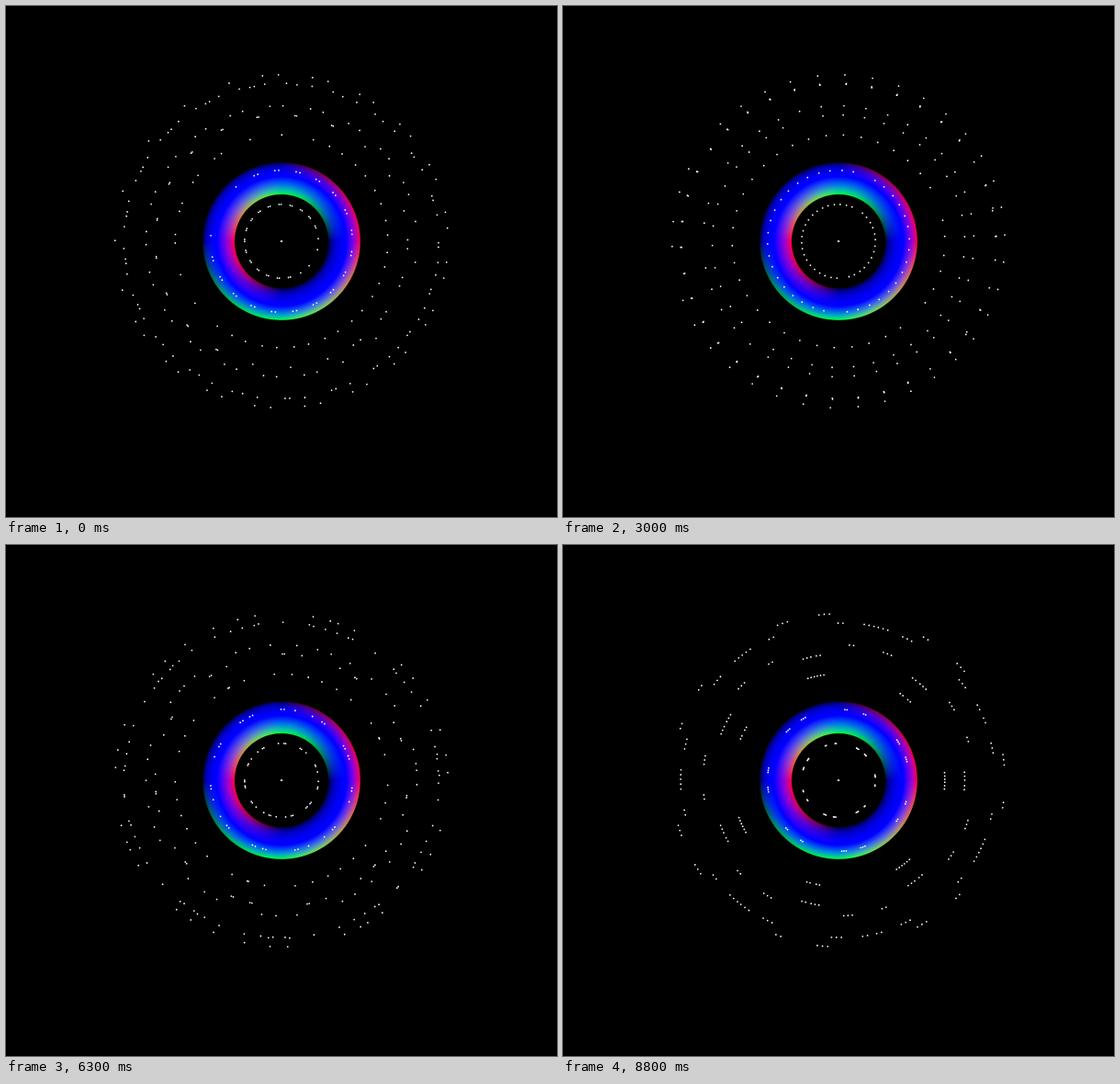
Recreate the animation shown at these times as an HTML page with a canvas. Size 600x556 px, loop 8.9 s.

```html
<!DOCTYPE html>
<html lang="en">
<head>
<meta charset="utf-8">
<title>Torus inside a sphere of dots</title>
<style>
html, body { margin: 0; width: 100%; height: 100%; overflow: hidden; background: #000; }
canvas { display: block; }
</style>
</head>
<body>
<canvas id="stage" width="600" height="556"></canvas>
<script>
const ctx = document.getElementById('stage').getContext('2d');
const W = 600, H = 556, CX = 300, CY = 256;
const LOOP = 8900, TICK = 100;
const RAD = Math.PI / 180;

// Dots on a sphere: each one is a tilt step and a turn step on from the last.
const DOTS = 360, TILT = 18, PHASE = 87;
const SPHERE = 171, DEPTH = 0.332;

// Torus as it appears from the front: hole, crest and outer edge.
const INNER = 51, CREST = 70.5, OUTER = 85.8;

// Turn step in degrees: [tick, value].
const TURNS = [
  [0, 108.865], [13, 148.02], [30, 198.95], [44, 241.22],
  [56, 276.93], [71, 325.11], [88, 390.87]
];

function turnAt(tick) {
  const i = Math.max(1, TURNS.findIndex(([at]) => at >= tick));
  const [t0, a] = TURNS[i - 1], [t1, b] = TURNS[i];
  return a + (b - a) * (tick - t0) / (t1 - t0);
}

// Red, green and blue follow the x, y and z of the surface normal.
function makeTorus() {
  const layer = document.createElement('canvas');
  layer.width = W;
  layer.height = H;
  const c = layer.getContext('2d');
  const img = c.createImageData(W, H);
  for (let y = 0; y < H; y++) {
    for (let x = 0; x < W; x++) {
      const dx = x + 0.5 - CX, dy = y + 0.5 - CY;
      const dist = Math.hypot(dx, dy);
      const cover = Math.min(dist - INNER, OUTER - dist) + 0.5;
      if (cover <= 0) continue;
      const half = dist < CREST ? CREST - INNER : OUTER - CREST;
      const u = Math.max(-1, Math.min(0.97, (dist - CREST) / half));
      const normal = [u * dx / dist, u * dy / dist, Math.sqrt(1 - u * u), Math.min(1, cover)];
      img.data.set(normal.map(v => 255 * Math.max(0, v)), (y * W + x) * 4);
    }
  }
  c.putImageData(img, 0, 0);
  return layer;
}

function drawDots(turn, front) {
  ctx.fillStyle = '#fff';
  for (let n = 0; n < DOTS; n++) {
    const tilt = n * TILT % 360 * RAD;
    const z = Math.cos(tilt);
    if (z > 0 !== front) continue;
    const r = SPHERE * Math.sin(tilt) / (1 - DEPTH * z);
    const a = (n * turn + PHASE) * RAD;
    ctx.beginPath();
    ctx.arc(CX + r * Math.cos(a), CY - r * Math.sin(a), 0.88, 0, 2 * Math.PI);
    ctx.fill();
  }
}

function draw(tick) {
  const turn = turnAt(tick);
  ctx.fillStyle = '#000';
  ctx.fillRect(0, 0, W, H);
  drawDots(turn, false);
  ctx.drawImage(torus, 0, 0);
  drawDots(turn, true);
}

const torus = makeTorus();
const start = performance.now();

function run() {
  draw(Math.floor((performance.now() - start) % LOOP / TICK));
  requestAnimationFrame(run);
}
run();
</script>
</body>
</html>
```
